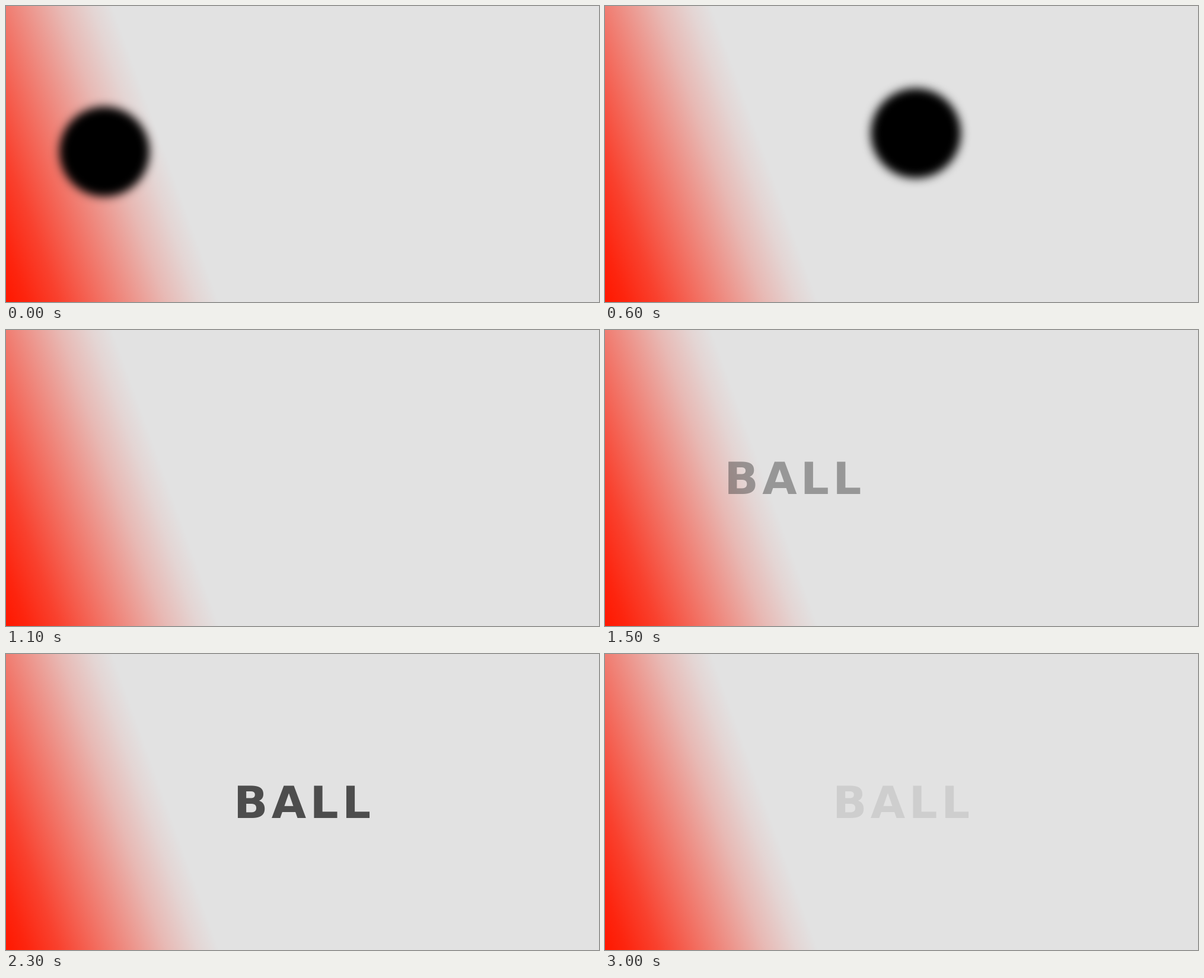
Animation of 1000 by 500 pixels, one loop 3.3 s. Source, as an HTML page:

```html
<!DOCTYPE html>
<html lang="en">
<head>
<meta charset="utf-8">
<title>Ball</title>
<style>
  html, body { margin: 0; width: 100%; height: 100%; overflow: hidden; background: #e2e2e2; }
  svg { display: block; width: 100%; height: 100%; }
  text { font: bold 75.5px "DejaVu Sans", sans-serif; letter-spacing: 6.3px; font-kerning: none; fill: #282828; }
</style>
</head>
<body>
<svg viewBox="0 0 1000 500">
  <defs>
    <linearGradient id="glow" gradientUnits="userSpaceOnUse" x1="0" y1="500" x2="318.7" y2="385.3">
      <stop offset="0" stop-color="#ff1800"/>
      <stop offset=".1" stop-color="#ff1800" stop-opacity=".936"/>
      <stop offset=".25" stop-color="#ff1800" stop-opacity=".797"/>
      <stop offset=".5" stop-color="#ff1800" stop-opacity=".5"/>
      <stop offset=".75" stop-color="#ff1800" stop-opacity=".203"/>
      <stop offset=".9" stop-color="#ff1800" stop-opacity=".064"/>
      <stop offset="1" stop-color="#ff1800" stop-opacity="0"/>
    </linearGradient>
    <filter id="soft" x="-30%" y="-30%" width="160%" height="160%" color-interpolation-filters="sRGB">
      <feGaussianBlur stdDeviation="8"/>
    </filter>
  </defs>
  <rect width="1000" height="500" fill="#e2e2e2"/>
  <rect width="1000" height="500" fill="url(#glow)"/>
  <circle id="ball" r="76" filter="url(#soft)"/>
  <text id="word" y="277">BALL</text>
</svg>
<script>
  const LOOP = 3300, STEP = 100, LAST = 30;
  const BALL_END = 10, WORD_START = 11, WORD_PEAK = 21;
  // ball height at every second step
  const heights = [246, 275, 240, 215, 198, 306];
  const ball = document.getElementById('ball');
  const word = document.getElementById('word');
  const lerp = (a, b, k) => a + (b - a) * k;

  function ballY(n) {
    const i = Math.min(Math.floor(n / 2), heights.length - 2);
    return lerp(heights[i], heights[i + 1], n / 2 - i);
  }

  function draw(n) {
    const rolling = n <= BALL_END;
    ball.style.display = rolling ? '' : 'none';
    if (rolling) {
      ball.setAttribute('cx', lerp(166, 763, n / BALL_END));
      ball.setAttribute('cy', ballY(n));
    }
    const slide = Math.min((n - WORD_START) / 10, 1);
    word.style.display = slide > 0 ? '' : 'none';
    word.setAttribute('x', lerp(79.5, 384, slide));
    word.setAttribute('opacity', Math.max(0, 1 - Math.abs(n - WORD_PEAK) / 10));
  }

  const start = performance.now();
  function tick() {
    const t = (performance.now() - start) % LOOP;
    draw(Math.min(Math.floor(t / STEP), LAST));
    requestAnimationFrame(tick);
  }
  tick();
</script>
</body>
</html>
```
